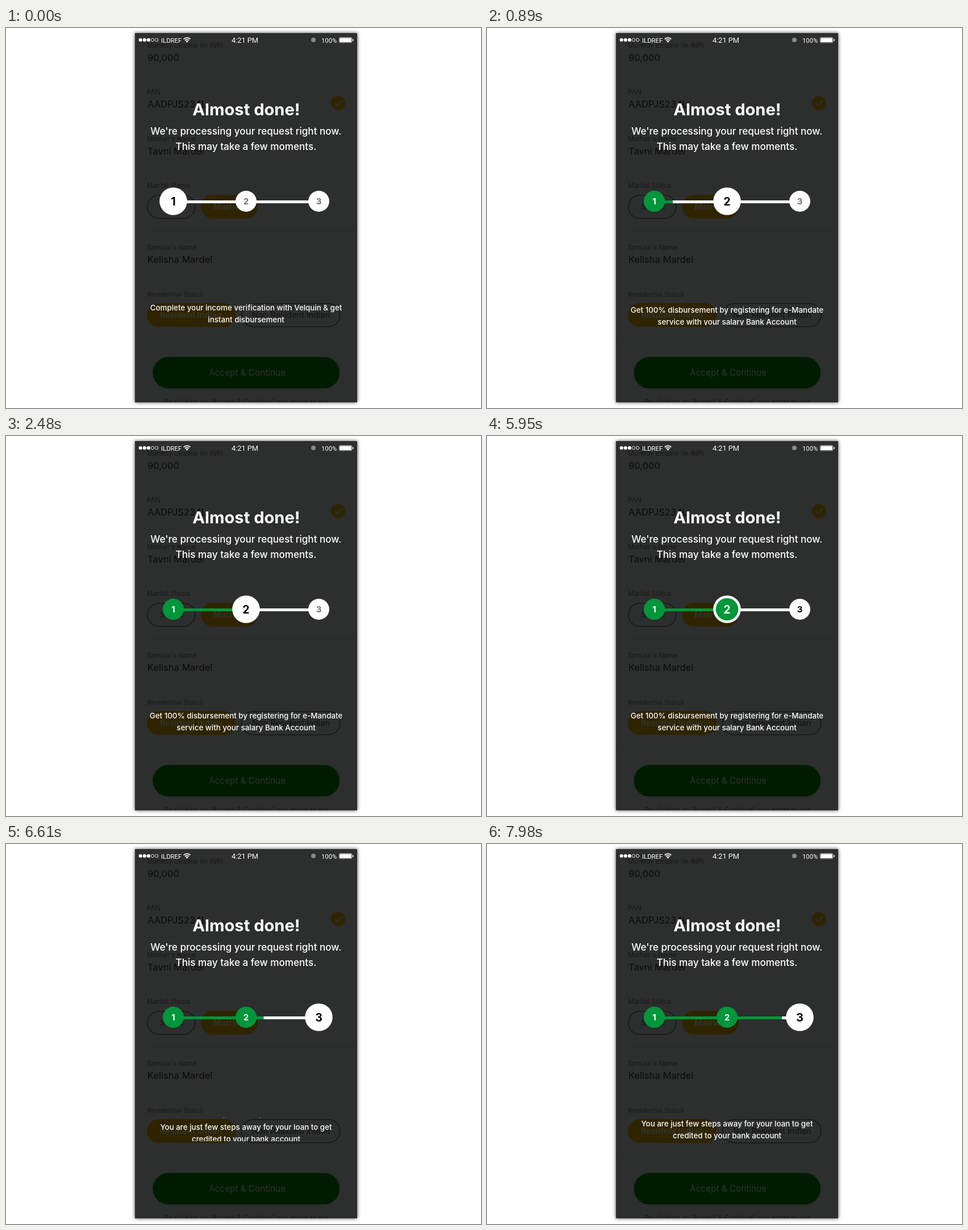
Write an HTML page that moves like this. It is 836x670 px and loops after 8000 ms.

```html
<!DOCTYPE html>
<html lang="en">
<head>
<meta charset="utf-8">
<title>Progress steps</title>
<style>
  html, body { margin: 0; width: 100%; height: 100%; overflow: hidden; background: #fff; }
  svg { display: block; width: 100vw; height: 100vh; font-family: Inter, sans-serif; }
  .mid { text-anchor: middle; }
  .phone { fill: #2d2e2e; filter: drop-shadow(0 0 3px rgba(0, 0, 0, .75)); }
  .status { font: 11.3px Roboto, sans-serif; fill: #fff; }
  .clock { font-size: 12.8px; }
  .label { font-size: 11.8px; fill: #191919; }
  .value { font-size: 16.5px; fill: #0c0c0c; }
  .on { fill: #2f2400; }
  .off { fill: none; stroke: #171717; stroke-width: 1.5; }
  .rule { stroke: #272828; }
  .faint { stroke: #2a2b2b; }
  .pick { font-size: 14.5px; font-weight: 700; fill: #33332a; }
  .other { font-size: 14.5px; fill: #131313; }
  .title { font-size: 29.1px; font-weight: 700; fill: #fff; }
  .sub { font-size: 17.1px; font-weight: 500; fill: #fff; }
  .hint { font-size: 13.35px; font-weight: 500; fill: #fff; }
  .digit { font-size: 15px; font-weight: 700; text-anchor: middle; }
</style>
</head>
<body>
<svg viewBox="0 0 836 670">
  <defs>
    <clipPath id="screen"><rect x="227" y="9" width="391" height="651"/></clipPath>
    <clipPath id="window"><rect x="227" y="482.5" width="391" height="41.5"/></clipPath>
  </defs>
  <rect class="phone" x="227" y="9" width="391" height="651"/>

  <g clip-path="url(#screen)">
    <g id="form"></g>
    <path class="faint" d="M248 82.5H618M248 164.5H618M248 247.5H618M248 439.5H618"/>
    <path class="rule" d="M248 357.5H618M227 547.5H618"/>
    <circle class="on" cx="584.5" cy="132.5" r="12.5"/>
    <path d="M579 132.5l4 4 7.5-8" fill="none" stroke="#2d2e2e" stroke-width="2"/>

    <rect class="off" x="248.75" y="294.75" width="84" height="41" rx="20.5"/>
    <text class="other" x="271" y="320">Single</text>
    <rect class="on" x="343" y="294" width="100" height="42" rx="21"/>
    <text class="pick" x="365" y="320">Married</text>

    <rect class="on" x="248" y="485" width="156" height="42" rx="21"/>
    <text class="pick" x="271" y="511">Resident Indian</text>
    <rect class="off" x="414.75" y="485.75" width="173" height="41" rx="20.5"/>
    <text class="other" x="433" y="511">Non Resident Indian</text>

    <rect x="258.5" y="580" width="328.5" height="55.5" rx="27" fill="#001c00"/>
    <text class="mid" x="424.5" y="613" font-size="15.3" fill="#2f322f">Accept &amp; Continue</text>
    <text class="label mid" x="423" y="663">By clicking on "Accept &amp; Continue" you agree to our</text>
  </g>

  <g class="status">
    <circle cx="236.7" cy="21" r="3.1"/>
    <circle cx="243.8" cy="21" r="3.1"/>
    <circle cx="250.9" cy="21" r="3.1"/>
    <g fill="none" stroke="#fff" stroke-width=".8">
      <circle cx="258" cy="21" r="2.7"/>
      <circle cx="265.1" cy="21" r="2.7"/>
    </g>
    <text x="273" y="25.5">ILDREF</text>
    <path d="M312.6 19.6a8.2 8.2 0 0 1 11.8 0M314.9 22a5 5 0 0 1 7.2 0"
          fill="none" stroke="#fff" stroke-width="1.7"/>
    <path d="M316.4 23.4a3 3 0 0 1 4.2 0l-2.1 2.4z"/>
    <text class="clock mid" x="420.5" y="25.5">4:21 PM</text>
    <circle cx="541" cy="21" r="4" fill="#8a8b8b"/>
    <text x="555" y="25.5">100%</text>
    <rect x="586" y="16.5" width="23" height="9.5" rx="2" fill="#2d2e2e" stroke="#a8a8a8" stroke-width=".8"/>
    <rect x="587" y="17.5" width="21" height="7.5" rx="1"/>
    <rect x="609.9" y="19.3" width="1.6" height="4" rx=".8"/>
  </g>

  <text class="title mid" x="423" y="154">Almost done!</text>
  <text class="sub mid" x="422.3" y="188">We're processing your request right now.</text>
  <text class="sub mid" x="422.5" y="215">This may take a few moments.</text>

  <rect x="294.5" y="304" width="256" height="5" fill="#fff"/>
  <rect id="bar" x="294.5" y="304" width="0" height="5" fill="#00963a"/>
  <g id="steps"></g>
  <g clip-path="url(#window)"><g id="hints"></g></g>
</svg>

<script>
const LOOP = 8000, GREEN = '#00963a', HINT_H = 45;
const $ = id => document.getElementById(id);

function add(parent, tag, attrs, text = '') {
  const el = document.createElementNS('http://www.w3.org/2000/svg', tag);
  for (const k in attrs) el.setAttribute(k, attrs[k]);
  el.textContent = text;
  return parent.appendChild(el);
}

// Form fields: label, label baseline, value
[
  ['Monthly Income (in INR)', 34.5, '90,000'],
  ['PAN', 117, 'AADPJS234L'],
  ["Mother's Name", 199.5, 'Tavni Mardel'],
  ['Marital Status', 282],
  ["Spouse's Name", 391, 'Kelisha Mardel'],
  ['Residential Status', 473.5]
].forEach(([label, y, value]) => {
  add($('form'), 'text', { class: 'label', x: 248, y }, label);
  if (value) add($('form'), 'text', { class: 'value', x: 249, y: y + 23 }, value);
});

[
  ['Complete your income verification with Velquin & get', 'instant disbursement'],
  ['Get 100% disbursement by registering for e-Mandate', 'service with your salary Bank Account'],
  ['You are just few steps away for your loan to get', 'credited to your bank account']
].forEach((lines, i) => lines.forEach((line, j) =>
  add($('hints'), 'text', { class: 'hint mid', x: 422.5, y: 497.5 + i * HINT_H + j * 21 }, line)));

// Each step is active from `on` until it is completed at `off`
const steps = [[-LOOP, 140], [140, 5950], [5950, 2 * LOOP]].map(([on, off], i) => {
  const g = add($('steps'), 'g', { transform: `translate(${294.5 + 128 * i} 305.5)` });
  return {
    on, off,
    disc: add(g, 'circle', { fill: '#fff' }),
    core: add(g, 'circle', { fill: GREEN }),
    digit: add(g, 'text', { class: 'digit', y: 5.5 }, i + 1)
  };
});

const clamp = x => Math.min(1, Math.max(0, x));

// cubic-bezier(.25, .1, .25, 1)
function ease(x) {
  x = clamp(x);
  let lo = 0, hi = 1;
  for (let i = 0; i < 24; i++) {
    const u = (lo + hi) / 2, v = 1 - u;
    if (.75 * u * v + u ** 3 < x) lo = u; else hi = u;
  }
  const u = lo, v = 1 - u;
  return .3 * u * v * v + 3 * u * u * v + u ** 3;
}

// Right end of the green bar: [time, x]
const barPath = [[140, 294.5], [530, 316], [890, 327], [1760, 370], [2480, 399],
                 [2600, 422.5], [5950, 422.5], [6610, 453.5], [8000, 520]];

function barEnd(t) {
  if (t <= barPath[0][0]) return barPath[0][1];
  const i = barPath.findIndex(p => p[0] >= t);
  const [t0, x0] = barPath[i - 1], [t1, x1] = barPath[i];
  return x0 + (x1 - x0) * (t - t0) / (t1 - t0);
}

function draw(t) {
  for (const s of steps) {
    const done = t >= s.off;
    const size = ease((t - s.on) / 300) - ease((t - s.off) / 300);
    s.disc.setAttribute('r', done ? 18 + 6.3 * size : 18.5 + 5.8 * size);
    s.core.setAttribute('r', done ? 18.5 + 1.3 * size : 0);
    s.digit.setAttribute('fill', done ? '#fff' : t >= s.on ? '#000' : '#707070');
    s.digit.setAttribute('transform', `scale(${1 + .3 * size})`);
  }
  $('bar').setAttribute('width', barEnd(t) - 294.5);
  const scroll = ease((t - 450) / 700) + ease((t - 6210) / 700);
  $('hints').setAttribute('transform', `translate(0 ${-HINT_H * scroll})`);
}

const start = performance.now();
function tick() {
  draw((performance.now() - start) % LOOP);
  requestAnimationFrame(tick);
}
draw(0);
requestAnimationFrame(tick);
</script>
</body>
</html>
```
